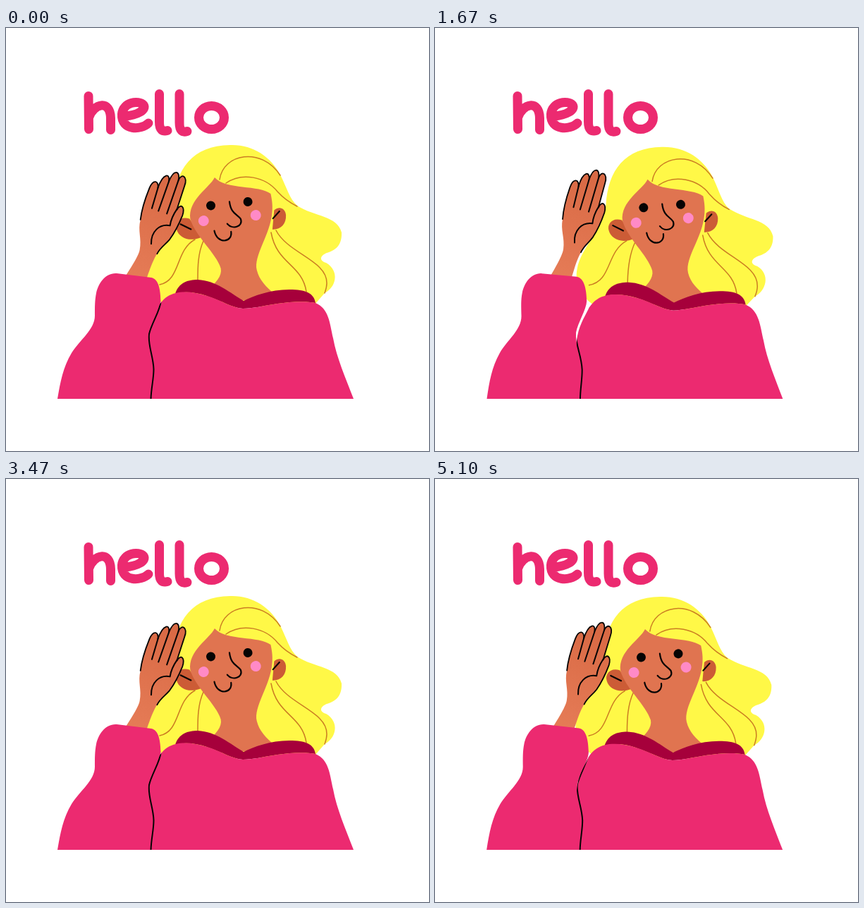
These frames come from a looping animation (600 px wide and 600 px high, 5.13 s). An HTML page with a canvas:

```html
<!DOCTYPE html>
<html lang="en">
<head>
<meta charset="utf-8">
<title>hello</title>
<style>
html, body { margin: 0; width: 100%; height: 100%; overflow: hidden; background: #fff; }
canvas { display: block; width: 600px; height: 600px; }
</style>
</head>
<body>
<canvas id="stage" width="600" height="600" role="img" aria-label="hello"></canvas>
<script>
const ctx = document.getElementById('stage').getContext('2d');
const LOOP = 5130, CYCLE = 5120 / 3;
const PINK = '#ec2a70', DARK = '#a6003b', YELLOW = '#fff847', STRAND = '#cb7d22';
const SKIN = '#e07450', EAR = '#cc5c36', CHEEK = '#ff8ac6', INK = '#060404';

const shift = (d, dx, dy) => {
  let n = 0;
  return d.replace(/[\d.]+/g, v => +v + (n++ % 2 ? dy : dx));
};

// Each flexible shape has three poses: near the head, raised, overshoot.
const hair = [
  'M240 400 C205 385 195 360 200 340 C206 310 232 290 238 250 C240 200 264 167 318 166 C350 165 375 182 389 208 C399 228 402 242 413 252 C438 268 470 266 476 290 C477 310 465 316 455 319 C445 323 444 330 454 333 C474 345 468 368 452 376 L438 392',
  'M262 430 C236 415 220 390 220 358 C221 318 275 308 291 262 C304 222 325 199 363 199 C405 199 432 215 446 246 C453 265 452 288 461 304 C482 324 514 328 517 354 C516 374 496 374 490 376 C477 381 477 388 488 390 C501 398 490 422 474 434 L455 440',
  'M265 435 C245 412 234 400 235 372 C237 330 285 315 300 275 C309 235 330 204 372 203 C412 203 440 222 455 252 C462 272 462 296 471 314 C494 332 524 332 527 360 C525 380 508 380 503 383 C490 387 488 394 500 398 C516 408 512 430 485 443 L460 446'
];
const strands = [
  'M303 215 C308 178 362 168 389 209 M312 220 C335 204 368 211 385 232 C395 243 403 248 413 253 M268 300 C240 315 248 358 218 364 M280 302 C272 320 272 340 272 357 M383 287 C400 320 456 330 455 362 C455 368 453 373 452 376 M376 290 C384 335 420 335 426 374',
  'M363 246 C374 212 430 208 448 259 M374 254 C398 241 424 250 436 276 C444 290 453 299 463 306 M313 322 C275 342 280 378 224 372 M325 326 C308 350 290 370 286 401 M428 331 C440 362 484 375 482 412 C482 420 479 427 475 432 M421 338 C428 372 447 372 449 400',
  'M373 250 C386 216 440 215 458 266 M384 259 C408 245 432 256 445 282 C454 296 461 306 470 314 M320 326 C286 344 296 400 238 395 M335 330 C318 354 310 376 313 406 M436 338 C448 368 494 380 493 418 C493 430 489 437 485 441 M430 344 C437 378 460 380 465 412'
];
const hood = [
  'M240 377 C245 361 258 357 272 357 C298 358 318 376 337 387 C352 380 374 371 402 371 C425 371 437 376 439 390 C424 387 405 388 385 391 C365 394 350 398 336 398 C320 397 305 386 285 380 C270 375 253 373 240 377',
  'M257 417 C263 403 285 400 302 402 C330 404 345 411 360 418 C375 411 400 401 425 399 C445 398 456 404 459 419 C445 414 425 415 405 419 C385 423 370 430 360 430 C345 429 325 420 305 417 C290 415 270 414 257 417'
];
hood.push(shift(hood[1], 5, 3.5));
const body = [
  'M200 526 C200 490 199 450 202 432 C205 414 214 402 218 392 C225 382 232 378 241 376 C253 373 270 375 285 380 C305 386 320 397 336 398 C350 398 365 394 385 391 C405 388 424 387 439 390 C458 398 459 418 464 440 C469 468 482 497 493 526',
  'M200 526 C200 512 201 500 202 488 C213 465 219 453 225 446 C237 430 247 420 258 417 C270 414 290 415 305 417 C325 420 345 429 360 430 C370 430 385 423 405 419 C425 415 445 414 459 419 C478 426 484 458 488 478 C491 495 494 512 497 526',
  'M198 526 C198 512 199 505 200 497 C211 475 217 464 224 453 C236 434 248 424 262 420 C274 417 294 418 309 420 C330 423 350 433 366 433 C376 433 390 426 410 422 C430 418 450 418 464 422 C481 430 486 460 490 480 C493 497 496 512 498.5 526'
];
const sleeve = [
  'M73 526 C77 502 81 481 93 461 C104 443 126 428 126 408 C126 395 126 386 128 376 C131 362 141 347 157 348 L206 354 C217 356 219 372 219.5 388 C219 400 206 420 203 434 C201 450 209 466 209.5 484 C209.5 498 206 510 205.5 526',
  'M77 526 C77 500 78 478 83 462 C89 444 100 428 99 414 C97 398 92 388 94 376 C96 362 102 351 113 349 L165 343.5 C177 342 187 365 186 382 C185 398 179 404 180 416 C182 436 199 446 203 487 C205 500 207 512 209 526',
  'M74 526 C74 498 74 480 80 463 C86 447 95 430 94 416 C92 400 87 394 88 378 C90 362 96 352 108 350 L158 345.5 C170 344 181 364 180 382 C179 398 174 406 176 420 C180 444 198 452 201 496 C203 508 204 516 206 526'
];
// Rigid frames: x, y, angle in degrees.
const headPose = [[316.5, 249, -11.9], [380.5, 289.5, 0], [390, 296.5, 2.3]];
const handPose = [[200, 321, 22], [143, 310, 0], [137, 313, -3]];

// Head parts live in the head's frame: turned to the hand, then facing front.
const front = (turned, plain) => [turned, plain, plain];
const face = front(
  'M368 249 C358 262 324 272 322 300 C324 325 348 355 350 377 C350 388 338 396 326 403 L318 420 L428 436 L418 429 C407 416 400 404 399.5 390 C399 368 429 345 438 313 C441 303 441 295 441 288 C428 272 380 270 368 249',
  'M364 246 C356 262 320 270 317 297 C319 325 345 352 347 378 C347 392 335 400 322 412 L330 432 L432 432 L425 414 C412 405 396 398 394 385 C396 360 424 345 433 306 C436 295 436 285 436 276 C405 262 372 262 364 246');
const ears = front(
  'M321 299 C309 292 299 300 300 310 C301 323 315 332 333 328 Z M441 312 C450 307 457 313 456 322 C454 335 444 341 433 338 Z',
  'M320 294 C308 287 298 295 299 305 C300 318 314 327 332 323 Z M432 305 C441 300 448 306 447 315 C445 328 435 334 424 331 Z');
const features = front(
  'M307 304 L320 314 M448 315 L437 323 M381.5 287 C380 304 388 306 392 314 C394 325 378 328 372 317 M352 323 C352 343 374 345 375 329',
  'M306 299 L319 309 M441 310 L432 317 M380 286 C380 303 391 306 392 317 C391 328 377 327 374 319 M352 322 C352 342 374 344 375 328');

const P = d => new Path2D(d);
const outline = 'C111 250 111 235 111 222 C111 207 120 207 122 217 C121 193 131 191 133 203 C133 182 143 183 145 196 C145 184 156 186 156 200 L158.5 236 C160 224 168 227 169 240 C169 254 168 266 165 278 C162 288 157 293 156 304';
const hand = P('M123 368 C128 340 133 318 131 308 C128 292 118 284 116 268 ' + outline + ' C153 320 156 338 156 368 Z');
const handEdge = P('M116 268 ' + outline);
const fingers = P('M122 216 L125 247 M133 203 L135 247 M145 196 L147.5 246 M158.5 234 C156 245 156 252 158 260 C143 263 136 278 143 294');

const letters = [
  'M117 96.5 L117.5 143.5 M117.5 127 C124 107 148 101 148.5 128 L148.5 144.5',
  'M168 125 C186 124 200 116 195 109 C188 102 166 105 164.5 122 C163 146 192 145 202 135',
  'M217.5 93.5 L217.5 133 C217.5 145 222 147 229 145.5',
  'M246 93.5 L246 134 C246 146 250 148.5 257 146.5',
  'M273.5 127 A18 16.5 0 1 1 309.5 127 A18 16.5 0 1 1 273.5 127 Z'
].map(P);

const clamp = u => Math.max(0, Math.min(1, u));
const ease = u => (1 - Math.cos(Math.PI * clamp(u))) / 2;
const mix = (a, b, u) => a + (b - a) * u;

// Poses to blend: [from, to, amount]
function poseAt(t, back) {
  if (t < 300) return [0, 2, ease((t - 28) / 268)];
  if (t < 480) return [2, 1, ease((t - 300) / 180)];
  return [1, 0, ease((t - back) / (CYCLE - back))];
}

function morph(set, [a, b, u]) {
  const end = set[b].match(/[\d.]+/g);
  let n = 0;
  return P(set[a].replace(/[\d.]+/g, v => mix(+v, +end[n++], u).toFixed(2)));
}

function fill(path, color) {
  ctx.fillStyle = color;
  ctx.fill(path);
}

function stroke(path, color, width) {
  ctx.strokeStyle = color;
  ctx.lineWidth = width;
  ctx.stroke(path);
}

function dot(x, y, r, color) {
  ctx.beginPath();
  ctx.arc(x, y, r, 0, Math.PI * 2);
  ctx.fillStyle = color;
  ctx.fill();
}

function rigid(poses, pose, drawPart) {
  const [a, b, u] = pose;
  const [x, y, deg] = poses[a].map((v, i) => mix(v, poses[b][i], u));
  ctx.save();
  ctx.translate(x, y);
  ctx.rotate(deg * Math.PI / 180);
  ctx.translate(-poses[1][0], -poses[1][1]);
  drawPart(pose);
  ctx.restore();
}

function drawHead(pose) {
  fill(morph(ears, pose), EAR);
  fill(morph(face, pose), SKIN);
  dot(340, 306, 7.5, CHEEK);
  dot(414, 313.5, 7.5, CHEEK);
  dot(354.5, 287, 6.5, INK);
  dot(407, 292.5, 6.5, INK);
  stroke(morph(features, pose), INK, 2.2);
}

const handTone = ctx.createLinearGradient(0, 200, 0, 345);
handTone.addColorStop(0, '#d96a45');
handTone.addColorStop(1, '#e57b56');

function drawHand() {
  fill(hand, handTone);
  stroke(handEdge, INK, 1.8);
  stroke(fingers, INK, 2);
}

function hop(t) {
  if (t < 290) return 13 * Math.sin(clamp((t - 45) / 245) * Math.PI / 2);
  return 13 * (1 - ease((t - 290) / 130));
}

function drawWord(t) {
  letters.forEach((path, i) => {
    ctx.save();
    ctx.translate(0, -hop(t - i * 45));
    stroke(path, PINK, 13);
    ctx.restore();
  });
}

function draw(t) {
  const pose = poseAt(t, 1350), armPose = poseAt(t, 1420);
  const torso = morph(body, pose), arm = morph(sleeve, armPose);
  ctx.fillStyle = '#fff';
  ctx.fillRect(0, 0, 600, 600);
  ctx.lineCap = ctx.lineJoin = 'round';
  drawWord(t % (CYCLE / 2));
  fill(morph(hair, pose), YELLOW);
  stroke(morph(strands, pose), STRAND, 1.5);
  rigid(headPose, pose, drawHead);
  fill(morph(hood, pose), DARK);
  fill(torso, PINK);
  rigid(handPose, armPose, drawHand);
  fill(arm, PINK);
  ctx.save();
  ctx.clip(torso);
  stroke(arm, INK, 2);
  ctx.restore();
}

// 25 drawings per second shown on a 30 per second grid
function sceneTime(ms) {
  const tick = Math.floor(ms * 154 / LOOP + 0.2);
  return Math.floor(tick * 5 / 6) * 40 % CYCLE;
}

const start = performance.now();
function frame() {
  draw(sceneTime((performance.now() - start) % LOOP));
  requestAnimationFrame(frame);
}
frame();
</script>
</body>
</html>
```
